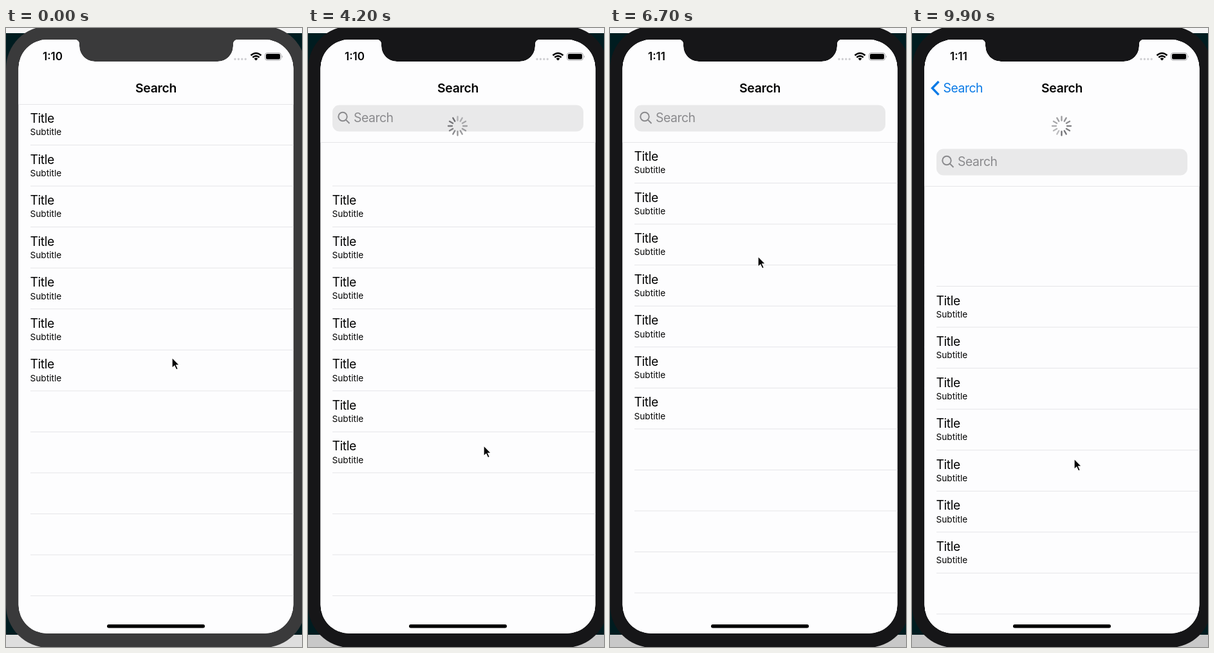
An HTML page that plays this animation: 460x960 px, repeating every 10000 ms.

```html
<!DOCTYPE html>
<html lang="en">
<head>
<meta charset="utf-8">
<title>Pull to refresh with a search bar</title>
<style>
  html, body { margin: 0; width: 100%; height: 100%; overflow: hidden; background: #001c20; }
  svg { display: block; width: 460px; height: 960px; }
  text { font-family: Inter, "Liberation Sans", sans-serif; fill: #050505; }
  .body { font-size: 19.36px; letter-spacing: -.45px; }
  .small { font-size: 13.67px; }
  .bold { font-size: 19.36px; font-weight: 600; letter-spacing: -.3px; text-anchor: middle; }
  .time { font-size: 17px; font-weight: 600; text-anchor: middle; }
  .hint { fill: #8a8a8d; }
  .link { fill: #0a7ae6; }
  .paper { fill: #fdfdfe; }
  .rule { stroke: #e5e5e8; }
</style>
</head>
<body>
<svg viewBox="0 0 460 960">
  <defs>
    <path id="glass" d="M64 18H107A7 7 0 0 1 114 25V28A24 24 0 0 0 138 52H329A24 24 0 0 0 353 28V25A7 7 0 0 1 360 18H402A44.500 44.500 0 0 1 446.500 62.500V894.500A44.500 44.500 0 0 1 402 939H64A44.500 44.500 0 0 1 19.500 894.500V62.500A44.500 44.500 0 0 1 64 18Z"/>
    <clipPath id="screen"><use href="#glass"/></clipPath>
  </defs>
  <rect width="460" height="960" fill="#001c20"/>
  <rect width="460" height="8" fill="#f4f4f4"/>
  <rect id="floor" y="941" width="460" height="19"/>
  <rect id="bezel" y="-3" width="466" height="964" rx="66"/>
  <use href="#glass" class="paper"/>
  <g clip-path="url(#screen)">
    <g id="pages"></g>
    <text id="oldTitle" class="bold" y="100">Search</text>
    <text id="newTitle" class="bold" y="100">Search</text>
    <g id="back">
      <path d="M41.500 83L31.500 93.300L41.500 103.600" fill="none" stroke="#0a7ae6" stroke-width="3.400"/>
      <text id="backLabel" class="body link" y="100">Search</text>
    </g>
    <text id="clock" class="time" x="72.500" y="50"></text>
    <path d="M356 48.300H373" stroke="#cfcfd2" stroke-width="3.400" stroke-linecap="round" stroke-dasharray="0 5.400"/>
    <g fill="none" stroke="#050505" stroke-width="2.600">
      <path d="M380.500 42.500Q388.500 35.500 396.500 42.500"/>
      <path d="M383.300 45.600Q388.500 41 393.700 45.600"/>
    </g>
    <path d="M385.600 47.400Q388.500 45 391.400 47.400L388.500 50.500Z"/>
    <rect x="402.500" y="38.500" width="25" height="11.500" rx="3.500" fill="none" stroke="#a5a5a8"/>
    <rect x="404" y="40" width="22" height="8.500" rx="2"/>
    <path d="M429 42.200Q431 44.200 429 46.500Z" fill="#a5a5a8"/>
    <rect x="157" y="925" width="152" height="5.400" rx="2.700"/>
  </g>
  <path id="cursor" d="M0 0V16.500L3.800 13L6.600 19L9.400 17.700L6.700 12H11.800Z" fill="#050505" stroke="#fff" stroke-width="1.300"/>
</svg>
<script>
const NS = "http://www.w3.org/2000/svg";
const LOOP = 10000, STEP = 100;
const ROW = 63.55, NAV = 118, WIDTH = 427, CENTER = 233;
const BAR = 59, REFRESH = 68, PULL = 223, OVERSHOOT = 50;
const $ = id => document.getElementById(id);
const clamp = (v, lo = 0, hi = 1) => Math.min(hi, Math.max(lo, v));

// Eased progress from 0 to 1 between two times.
function ramp(t, from, to) {
  const u = clamp((t - from) / (to - from));
  return u * u * (3 - 2 * u);
}
const bump = (t, from, to) => Math.sin(Math.PI * clamp((t - from) / (to - from)));

function set(el, attrs) {
  for (const name in attrs) el.setAttribute(name, attrs[name]);
}
function add(parent, tag, attrs = {}, text = "") {
  const el = parent.appendChild(document.createElementNS(NS, tag));
  set(el, attrs);
  el.textContent = text;
  return el;
}

function firstScroll(t) {
  return -10 * bump(t, 1500, 2100)
    + PULL * ramp(t, 2600, 3300)
    + (BAR + REFRESH - PULL) * ramp(t, 3500, 3800)
    - REFRESH * ramp(t, 4300, 4600)
    - (BAR + OVERSHOOT) * ramp(t, 4700, 5100)
    + OVERSHOOT * ramp(t, 5300, 5600)
    + BAR * ramp(t, 5900, 6600);
}
function secondScroll(t) {
  return BAR - 17.5 * ramp(t, 8500, 8800) + (PULL + 18) * ramp(t, 9000, 9900);
}

// The hand rests briefly at each turn of its path.
const turns = [
  { at: 200, x: 258, y: 511 },
  { at: 900, x: 150, y: 219 },
  { at: 1500, x: 275, y: 389 },
  { at: 2600, x: 268, y: 303 },
  { at: 3300, x: 270, y: 725 },
  { at: 5100, x: 276, y: 570 },
  { at: 5800, x: 245, y: 300 },
  { at: 6700, x: 230, y: 354 },
  { at: 8800, x: 250, y: 250 },
  { at: 9900, x: 252, y: 668 }
];
function pointer(t) {
  let { x, y } = turns[0];
  for (let i = 1; i < turns.length; i++) {
    const a = turns[i - 1], b = turns[i], p = ramp(t, a.at, b.at);
    x += (b.x - a.x) * p;
    y += (b.y - a.y) * p;
  }
  return `translate(${x} ${y})`;
}

function makePage() {
  const root = add($("pages"), "g");
  const sheet = { x: 19, y: 18, width: WIDTH + 1, class: "paper" };
  add(root, "rect", { ...sheet, height: 922 });
  const list = add(root, "g");
  for (let i = 0; i < 15; i++) {
    const y = NAV + i * ROW;
    add(list, "path", { d: `M38 ${y}H447`, class: "rule" });
    if (i < 7) {
      add(list, "text", { x: 37.5, y: y + 29, class: "body" }, "Title");
      add(list, "text", { x: 37.5, y: y + 48.3, class: "small" }, "Subtitle");
    }
  }
  const header = add(root, "rect", sheet);
  const rule = add(root, "path", { d: "M19 .5H447", class: "rule" });
  const search = add(root, "g");
  const field = add(search, "rect", { x: 38, y: 119.5, width: 390, fill: "#e9e9ea" });
  const hint = add(search, "g", { stroke: "#8a8a8d", "stroke-width": 2 });
  add(hint, "circle", { cx: 54, cy: 137.5, r: 6.7, fill: "none" });
  add(hint, "path", { d: "M59 142.500L64.500 148" });
  add(hint, "text", { x: 71, y: 146, class: "body hint", stroke: "none" }, "Search");
  const spinner = add(root, "g", {
    transform: "translate(232.500 152)", stroke: "#6e6e72",
    "stroke-width": 2.3, "stroke-linecap": "round"
  });
  const ticks = Array.from({ length: 12 }, (_, i) =>
    add(spinner, "path", { d: "M0 -8.500V-14.500", transform: `rotate(${i * 30})` }));
  return { root, list, header, rule, search, field, hint, ticks };
}

function drawPage(page, { x, scroll, shift, spin }) {
  const height = clamp(scroll - 18, 0, 41);
  const edge = NAV + clamp(scroll, 0, BAR) + shift;
  const pull = clamp((scroll - BAR - 12) / 56);
  set(page.root, { transform: `translate(${x} 0)` });
  set(page.list, { transform: `translate(0 ${scroll})` });
  set(page.header, { height: edge - 18 });
  set(page.rule, { transform: `translate(0 ${Math.round(edge)})` });
  set(page.search, { transform: `translate(0 ${shift})` });
  set(page.field, { height, rx: Math.min(11, height / 2) });
  set(page.hint, { opacity: clamp((height - 30) / 11) });
  page.ticks.forEach((tick, i) => {
    const glow = spin > 0 ? 1 - .6 * ((spin / 80 - i + 144) % 12) / 12 : 1;
    set(tick, { opacity: glow * clamp(pull * 12 - i) });
  });
}

const first = makePage(), second = makePage();

function draw(t) {
  const push = ramp(t, 7200, 7700), scroll = secondScroll(t);
  drawPage(first, { x: -.3 * WIDTH * push, scroll: firstScroll(t), shift: 0, spin: t - 3300 });
  drawPage(second, {
    x: WIDTH * (1 - push), scroll,
    shift: clamp(scroll - BAR, 0, REFRESH), spin: t - 9400
  });
  set(second.root, { visibility: push > 0 ? "visible" : "hidden" });

  set($("oldTitle"), { x: CENTER - 154 * push, opacity: 1 - push });
  set($("newTitle"), { x: CENTER + 200 * (1 - push), opacity: push });
  set($("back"), { opacity: push });
  set($("backLabel"), { x: 48.5 + 154 * (1 - push) });
  $("clock").textContent = t < 5800 ? "1:10" : "1:11";

  const early = t < 1400;
  set($("bezel"), { fill: early ? "#3a3a3b" : "#161618" });
  set($("floor"), { fill: early ? "#dedede" : "#c8c8c8" });
  set($("cursor"), { transform: pointer(t) });
}

const start = performance.now();
function tick() {
  const t = (performance.now() - start) % LOOP;
  draw(Math.floor(t / STEP) * STEP);
  requestAnimationFrame(tick);
}
tick();
</script>
</body>
</html>
```
